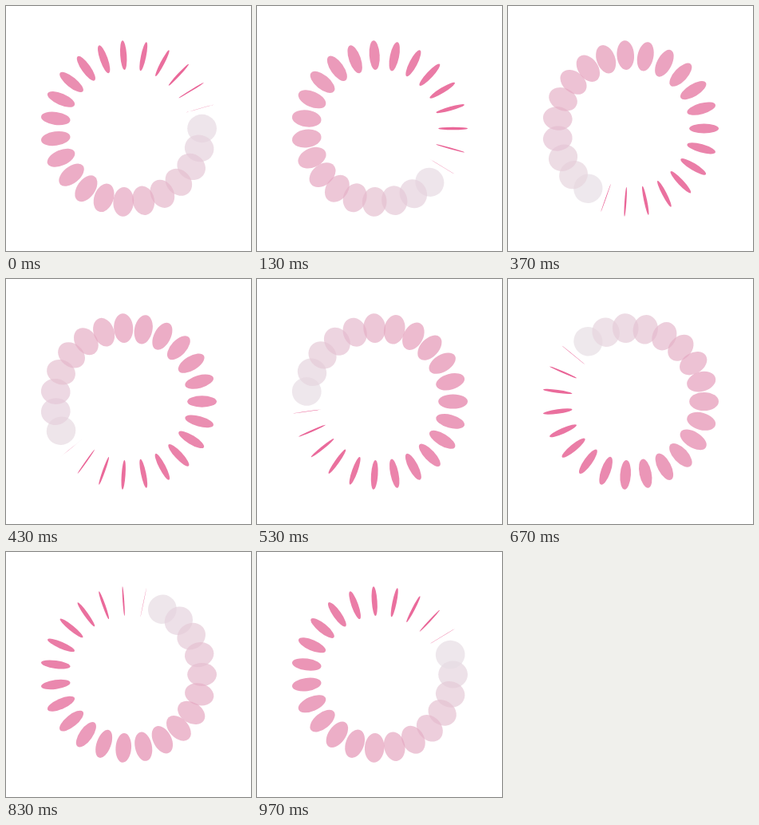
These frames come from a looping animation (307x307 px, 1000 ms). An HTML page:

```html
<!DOCTYPE html>
<html lang="en">
<head>
<meta charset="utf-8">
<title>Spinner</title>
<style>
  html, body { margin: 0; width: 100%; height: 100%; overflow: hidden; background: #fff; }
  svg { display: block; width: 100%; height: 100%; }
</style>
</head>
<body>
<svg viewBox="0 0 307 307"><g id="ring" transform="translate(153.5 153.5)" fill-opacity=".7"></g></svg>
<script>
const COUNT = 23, ORBIT = 92.1, RADIUS = 18.4;
const LOOP = 1000, FPS = 30, LAG = 0.94;
const PINK = [224, 22, 98], GREY = [231, 227, 232];

const ring = document.getElementById('ring');
const dots = Array.from({ length: COUNT }, (_, i) => {
  const dot = document.createElementNS('http://www.w3.org/2000/svg', 'ellipse');
  dot.setAttribute('transform', `rotate(${i * 360 / COUNT}) translate(${ORBIT} 0)`);
  dot.setAttribute('rx', RADIUS);
  return ring.appendChild(dot);
});

const mix = p => `rgb(${PINK.map((v, k) => Math.round(v + (GREY[k] - v) * p))})`;

// Steps fall on 30 fps ticks rounded to 10 ms: 0, 30, 70, 100, ...
function tick(ms) {
  const t = ms % LOOP, rest = t % 100;
  return Math.floor(t / 100) * 3 + (rest >= 30) + (rest >= 70);
}

// Each dot widens from a radial needle to a full circle while it fades.
function draw(ms) {
  const head = tick(ms) / FPS * COUNT - LAG;
  dots.forEach((dot, i) => {
    const p = ((head - i + COUNT) % COUNT + COUNT) % COUNT / COUNT;
    dot.setAttribute('ry', RADIUS * p);
    dot.setAttribute('fill', mix(p));
  });
}

function loop() {
  draw(performance.now());
  requestAnimationFrame(loop);
}
loop();
</script>
</body>
</html>
```
